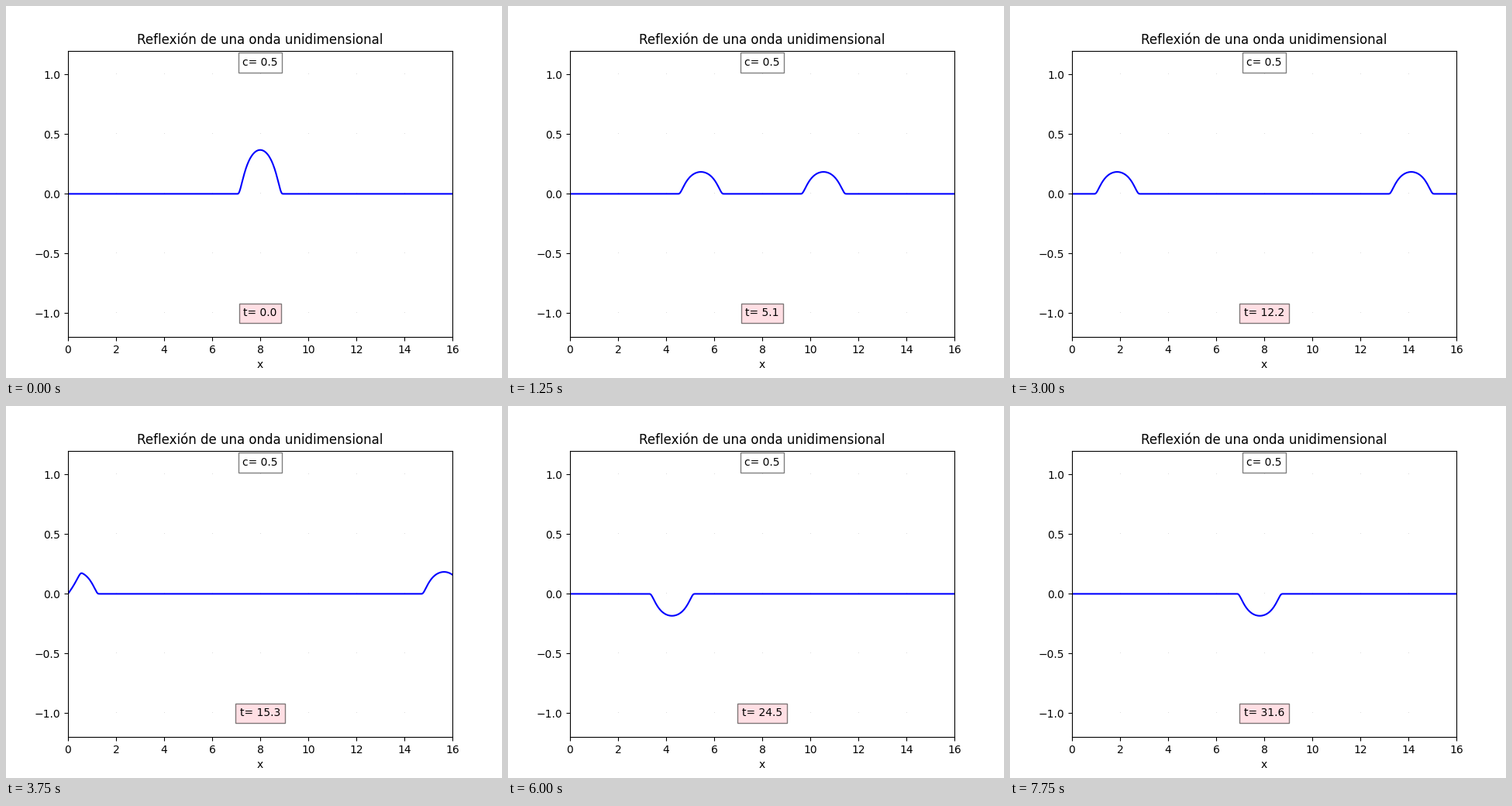
Write a matplotlib script that moves like this. It is 640 px wide and 480 px high and loops after 8 s.

```python
import numpy as np
import matplotlib.pyplot as plt
from matplotlib.animation import FuncAnimation

L = 16.0          # string length
C = 0.5           # wave speed
FRAMES = 32
DT = 50 / 49      # simulated time between frames

x = np.linspace(0, L, 801)


def bump(s):
    """Smooth pulse of half-width 1 centred on zero."""
    inside = np.abs(s) < 1
    gap = np.where(inside, 1 - s**2, 1)
    return np.where(inside, np.exp(-1 / gap), 0)


def wave(t):
    """Fixed end on the left, open end on the right."""
    d = C * t
    right = bump(x - L / 2 - d)
    left = bump(x - L / 2 + d)
    reflected = bump(x + L / 2 - d)
    return 0.5 * (right + left - reflected)


def boxed(y, text, color):
    return ax.text(L / 2, y, text, ha="center", va="center",
                   bbox={"facecolor": color, "alpha": 0.5})


plt.rcParams["font.family"] = "DejaVu Sans"
fig, ax = plt.subplots(figsize=(6.4, 4.8), dpi=100)
ax.set(xlim=(0, L), ylim=(-1.2, 1.2), xlabel="x",
       xticks=np.arange(0, 17, 2), yticks=np.arange(-1, 1.1, 0.5),
       title="Reflexión de una onda unidimensional")

# Faint dots where the grid lines would cross
gx, gy = np.meshgrid(np.arange(2, 15, 2), np.arange(-1, 1.1, 0.5))
hidden = (gx == 8) & (gy == -1)
ax.plot(gx[~hidden], gy[~hidden], ",", color="#dcdcdc", zorder=1)

line, = ax.plot(x, wave(0), color="b", lw=1.5)
boxed(1.1, f"c= {C}", "white")
clock = boxed(-1.0, "t= 0.0", "pink")


def update(i):
    t = i * DT
    line.set_ydata(wave(t))
    clock.set_text(f"t= {t:.1f}")
    return line, clock


anim = FuncAnimation(fig, update, frames=FRAMES, interval=250, repeat=True)
plt.show()
```
